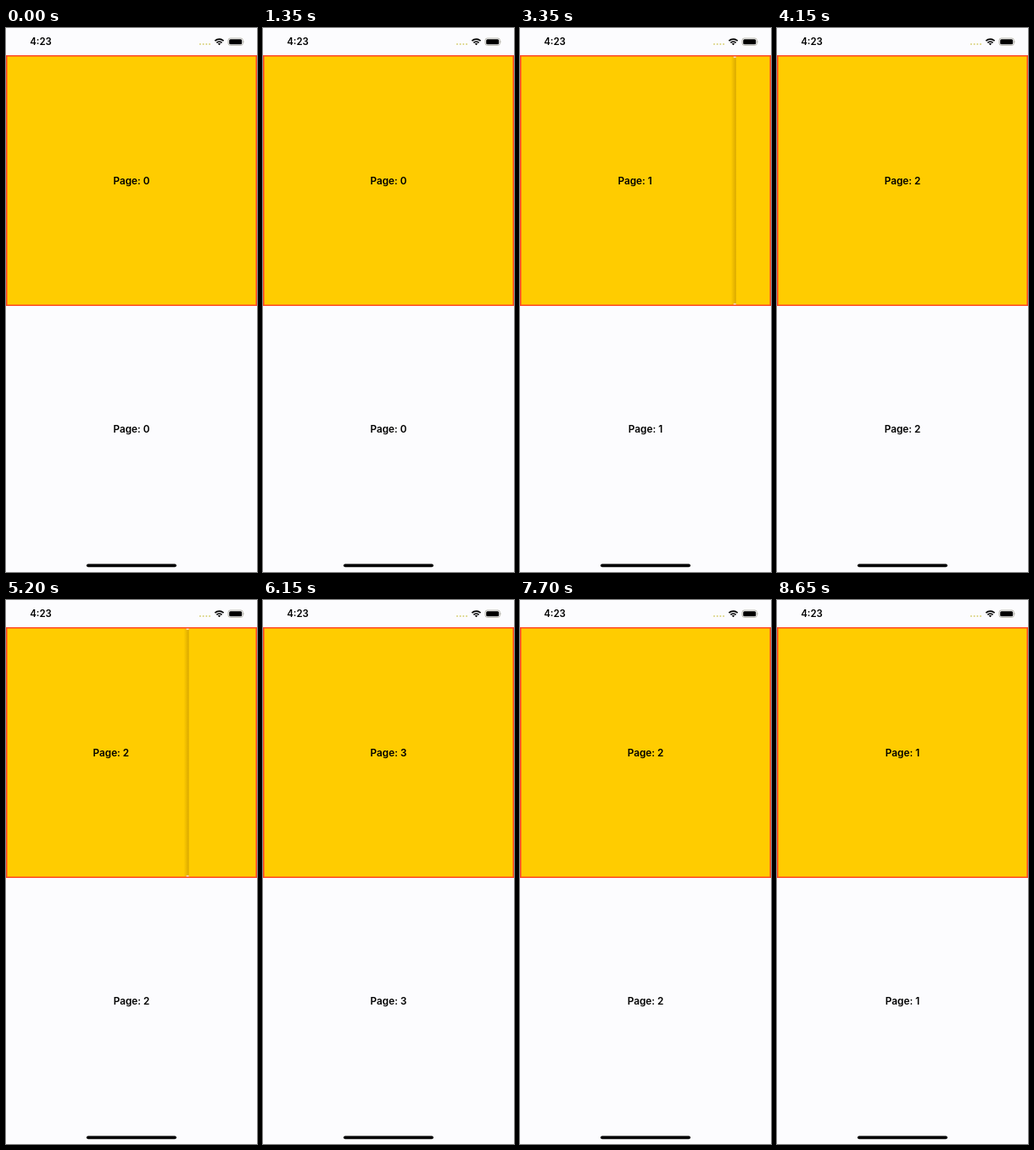
Recreate the animation shown at these times as an HTML page. Size 296x640 px, loop 8.7 s.

```html
<!DOCTYPE html>
<html lang="en">
<head>
<meta charset="utf-8">
<title>Pager</title>
<style>
  @property --pos { syntax: "<number>"; inherits: true; initial-value: 0; }

  html, body { margin: 0; width: 100%; height: 100%; overflow: hidden; }

  body {
    position: relative;
    background: #fcfcfe;
    color: #000;
    font: 600 11.8px Inter, "Liberation Sans", sans-serif;
    animation: swipe 8.7s cubic-bezier(.4, 0, .8, .6) infinite;
  }

  /* Each swipe: the finger drags to halfway, then the page settles. */
  @keyframes swipe {
    0%     { --pos: 0; }
    15.52% { --pos: 0; }
    24.14% { --pos: .5; animation-timing-function: cubic-bezier(.333, .613, .667, 1); }
    29.89% { --pos: 1; }
    34.48% { --pos: 1; }
    42.41% { --pos: 1.5; animation-timing-function: cubic-bezier(.333, .613, .667, 1); }
    47.7%  { --pos: 2; }
    54.02% { --pos: 2; }
    61.95% { --pos: 2.5; animation-timing-function: cubic-bezier(.333, .613, .667, 1); }
    67.24% { --pos: 3; }
    70.69% { --pos: 3; }
    78.28% { --pos: 2.5; animation-timing-function: cubic-bezier(.333, .613, .667, 1); }
    83.33% { --pos: 2; }
    88.51% { --pos: 2; }
    95.06% { --pos: 1.5; animation-timing-function: cubic-bezier(.333, .613, .667, 1); }
    99.43% { --pos: 1; }
    100%   { --pos: 1; }
  }

  .pager {
    position: absolute;
    top: 32px;
    left: 0;
    width: 296px;
    height: 295px;
    overflow: hidden;
  }
  .pager::after {
    content: "";
    position: absolute;
    inset: 0;
    box-shadow: inset 0 0 0 1.5px #ff4726;
  }

  .page, .label { --d: calc(var(--i) - var(--pos)); text-align: center; }

  /* The upper page covers the lower one, which drifts left more slowly. */
  .page {
    position: absolute;
    inset: 0;
    line-height: 296px;
    background: #fc0;
    transform: translateX(calc(296px * max(0, var(--d)) + 89px * clamp(-1, var(--d), 0)));
  }
  .page::before {
    content: "";
    position: absolute;
    top: 1px;
    bottom: 1px;
    left: -6px;
    width: 6px;
    background:
      linear-gradient(#f6e6c2 0 0) 3px 0 / 3px 2px no-repeat,
      linear-gradient(#f6e6c2 0 0) 3px 100% / 3px 2px no-repeat,
      linear-gradient(90deg, #7a500000, #7a500048);
    opacity: clamp(0, (1 - var(--d)) * 20, 1);
  }

  .label {
    position: absolute;
    top: 462px;
    left: 0;
    width: 296px;
    line-height: 20px;
    opacity: clamp(0, (.5 - max(var(--d), -1 * var(--d))) * 9999, 1);
  }

  svg { position: absolute; top: 0; left: 0; }
</style>
</head>
<body>
  <div class="pager">
    <div class="page" style="--i:0">Page: 0</div>
    <div class="page" style="--i:1">Page: 1</div>
    <div class="page" style="--i:2">Page: 2</div>
    <div class="page" style="--i:3">Page: 3</div>
  </div>
  <div class="label" style="--i:0">Page: 0</div>
  <div class="label" style="--i:1">Page: 1</div>
  <div class="label" style="--i:2">Page: 2</div>
  <div class="label" style="--i:3">Page: 3</div>

  <svg width="296" height="640" viewBox="0 0 296 640">
    <text x="41" y="20.4" text-anchor="middle" font-size="11.4">4:23</text>
    <path d="M229 19h12.5" stroke="#d9d27c" stroke-width="2" stroke-linecap="round" stroke-dasharray="0 3.7"/>
    <!-- Wi-Fi -->
    <g fill="none" stroke="#000" stroke-width="1.7">
      <path d="M246.4 15.2a7.3 7.3 0 0 1 10.2 0"/>
      <path d="M248.4 17.3a4.4 4.4 0 0 1 6.2 0"/>
    </g>
    <path d="M249.8 18.5a2.4 2.4 0 0 1 3.4 0l-1.7 1.8z"/>
    <!-- Battery -->
    <rect x="262" y="12" width="17.4" height="8.4" rx="2.5" fill="none" stroke="#aaa99c" stroke-width=".8"/>
    <rect x="263.2" y="13.2" width="15" height="6" rx="1.5"/>
    <path d="M280.3 14.8q1.3 1.4 0 2.8z" fill="#aaa99c"/>
    <rect x="95" y="630.4" width="106" height="3.8" rx="1.9"/>
  </svg>
</body>
</html>
```
